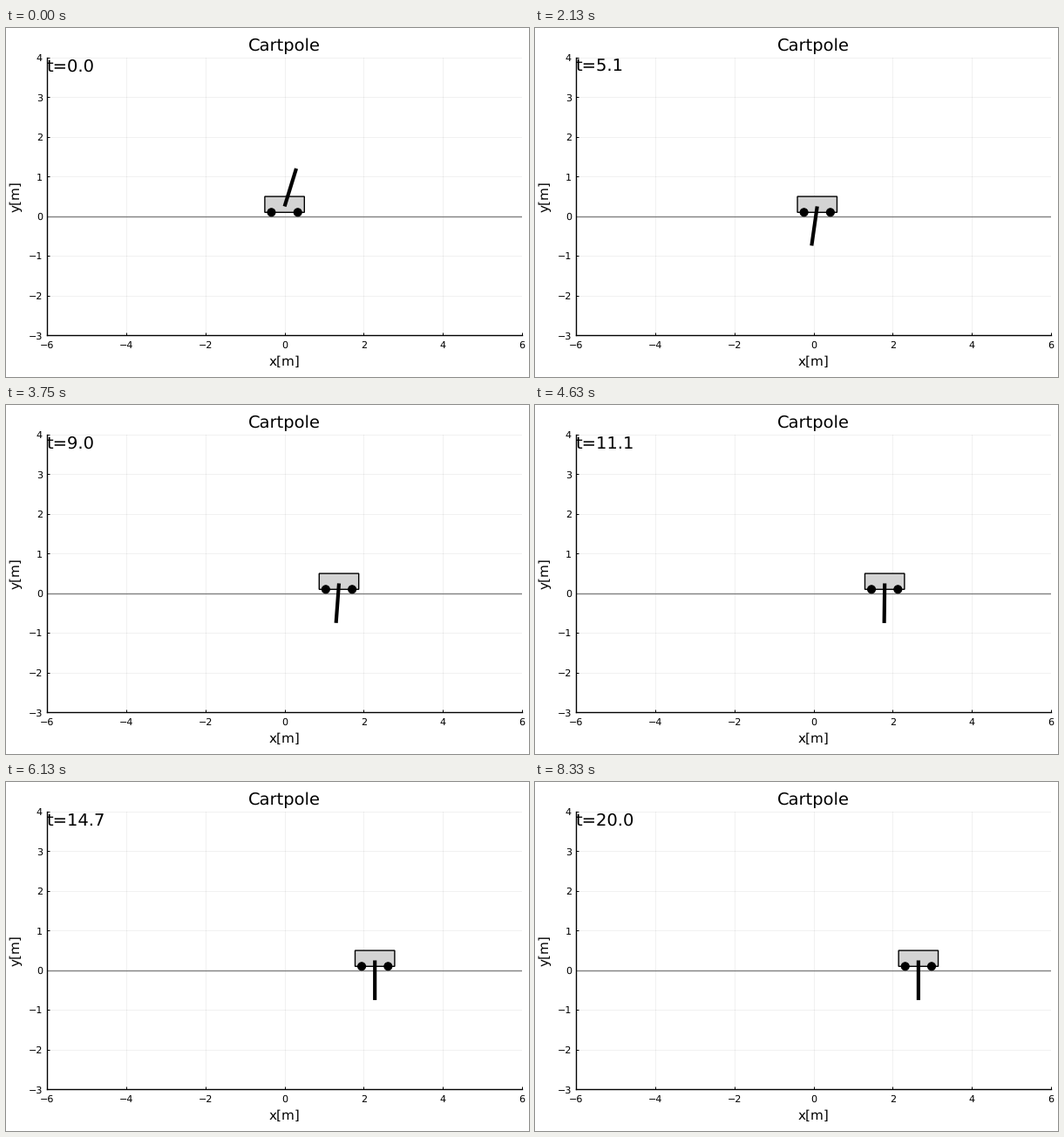
A matplotlib script for the animation above (8.37 s loop, 600x400 px).

```python
import matplotlib.pyplot as plt
import numpy as np
from matplotlib.animation import FuncAnimation
from matplotlib.patches import Circle, Rectangle

W, H, DPI = 600, 400, 100
FRAMES, LOOP_MS = 201, 8370
DT, SUBSTEPS = 0.1, 10

# cart mass, pole mass, pole length, gravity, cart and joint friction
M, m, L, g, b, c = 1.0, 0.3, 1.0, 9.81, 0.2, 0.2
PUSH_TIME, PUSH = 5.0, 5.88

plt.rcParams["font.family"] = "DejaVu Sans"
plt.rcParams["text.hinting"] = "none"


def derivative(state, force):
    x, th, v, w = state
    s, co = np.sin(th), np.cos(th)
    mass = np.array([[M + m, m * L * co], [m * L * co, m * L**2]])
    load = np.array([force - b * v + m * L * w**2 * s,
                     m * g * L * s - c * w])
    acc = np.linalg.solve(mass, load)
    return np.array([v, w, acc[0], acc[1]])


def rk4(state, force, h):
    k1 = derivative(state, force)
    k2 = derivative(state + h / 2 * k1, force)
    k3 = derivative(state + h / 2 * k2, force)
    k4 = derivative(state + h * k3, force)
    return state + h / 6 * (k1 + 2 * k2 + 2 * k3 + k4)


def simulate():
    state = np.array([0.0, 0.3, 0.0, 0.0])
    path = [state]
    push_step = round(PUSH_TIME / DT)
    for i in range(FRAMES - 1):
        force = PUSH if i == push_step else 0.0
        for _ in range(SUBSTEPS):
            state = rk4(state, force, DT / SUBSTEPS)
        path.append(state)
    return path


path = simulate()
fig = plt.figure(figsize=(W / DPI, H / DPI), dpi=DPI, facecolor="white")


def label(x, y, text, size, **kw):
    """Place text by its baseline, in pixels from the top left."""
    return fig.text(x / W, 1 - y / H, text, fontsize=size, color="black",
                    va=kw.pop("va", "baseline"), **kw)


left, right, top, bottom = 47.2, 592, 34, 352.2
ax = fig.add_axes([left / W, 1 - bottom / H, (right - left) / W, (bottom - top) / H])
ax.set(xlim=(-6, 6), ylim=(-3, 4), xticks=range(-6, 7, 2), yticks=range(-3, 5))
ax.patch.set_visible(False)
ax.spines[["top", "right"]].set_visible(False)
ax.spines[["left", "bottom"]].set_linewidth(1)
ax.set_axisbelow(True)
ax.grid(color="black", alpha=0.08, linewidth=0.5)
ax.tick_params(direction="in", length=2, width=0.7,
               labelbottom=False, labelleft=False)

for k in range(-6, 7, 2):
    px = left + (k + 6) / 12 * (right - left)
    label(px, 367, str(k).replace("-", "\u2212"), 8, ha="center")
for k in range(-3, 5):
    py = bottom - (k + 3) / 7 * (bottom - top)
    label(42, py + 4.2, str(k).replace("-", "\u2212"), 8, ha="right")

label(319.5, 26, "Cartpole", 14, ha="center")
label(319.5, 387, "x[m]", 11, ha="center")
label(16, 193.5, "y[m]", 11, ha="right", va="center", rotation=90,
      rotation_mode="default").set_x(18.5 / W)
clock = label(46.4, 49.5, "", 14, ha="left")

ax.axhline(0, color="#808080", linewidth=1, zorder=2)
cart = Rectangle((-0.5, 0.1), 1, 0.4, facecolor="#d3d3d3", edgecolor="black",
                 linewidth=1, snap=False, zorder=3)
wheels = [Circle((0, 0.1), 0.1, facecolor="black", edgecolor="black",
                 linewidth=0.7, zorder=4) for _ in range(2)]
for patch in (cart, *wheels):
    ax.add_patch(patch)
pole, = ax.plot([], [], color="black", linewidth=3, solid_capstyle="butt",
                snap=False, zorder=5)


def draw(i):
    x, th = path[i][:2]
    cart.set_x(x - 0.5)
    for wheel, side in zip(wheels, (-1, 1)):
        wheel.center = (x + side / 3, 0.1)
    pole.set_data([x, x + L * np.sin(th)], [0.25, 0.25 + L * np.cos(th)])
    clock.set_text(f"t={i * DT:.1f}")
    return cart, *wheels, pole, clock


anim = FuncAnimation(fig, draw, frames=FRAMES, interval=LOOP_MS / FRAMES,
                     repeat=True, repeat_delay=0)
plt.show()
```
